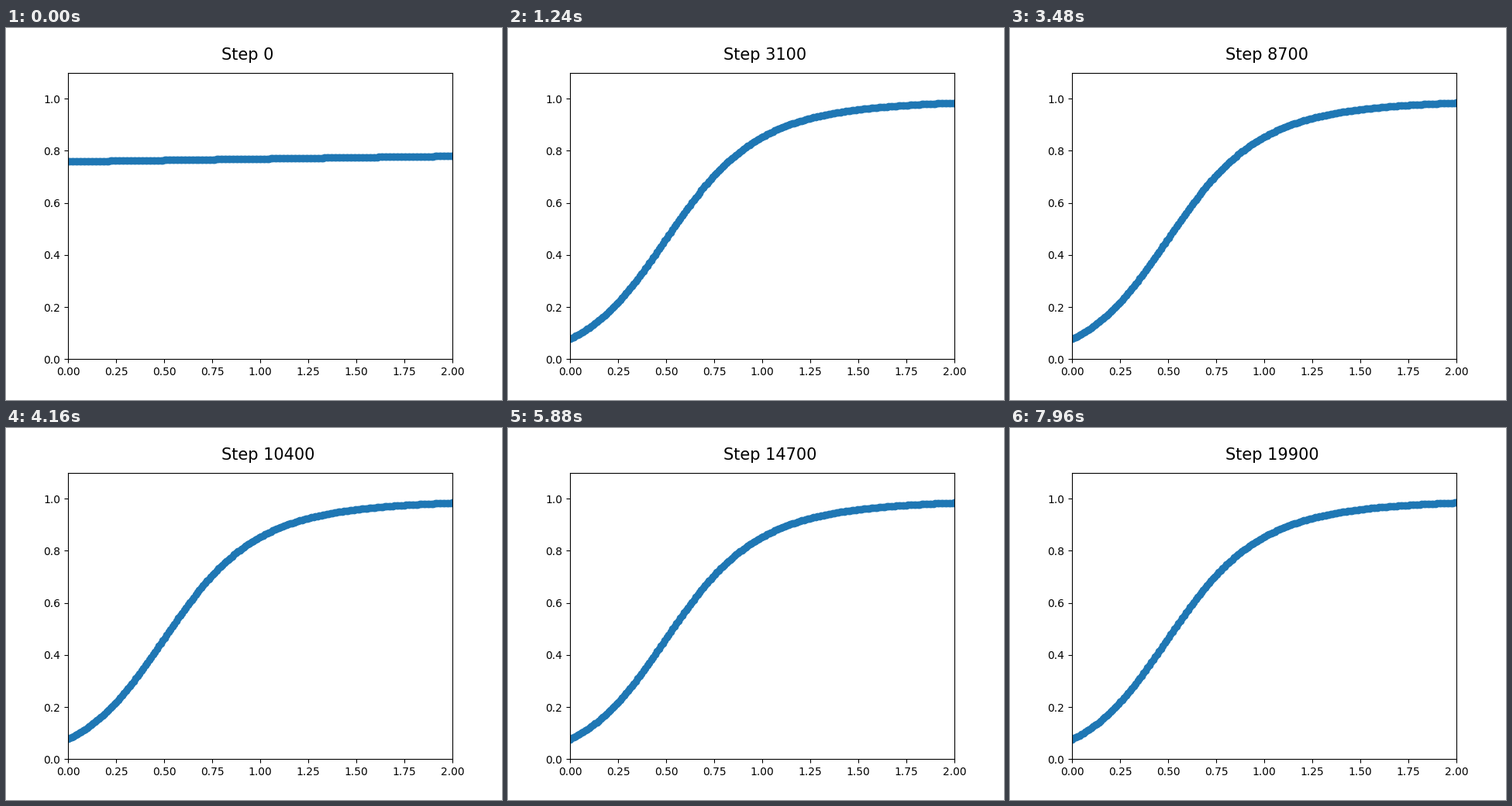
Animation of 640 by 480 pixels, one loop 8 s. Source, as a matplotlib script:

```python
import numpy as np
import matplotlib.pyplot as plt
from matplotlib.animation import FuncAnimation

FRAMES, INTERVAL = 200, 40
STEPS_PER_FRAME = 100

x = np.linspace(0, 2, 200)
knots = np.linspace(0, 2, 5)


def through(logits):
    """Smooth quartic through logits given at the knots."""
    return np.polyval(np.polyfit(knots, logits, 4), x)


start = 1.145 + 0.060 * x
fitted = through([-2.47, -0.152, 1.758, 3.13, 4.12])
settled = through([-2.50, -0.140, 1.760, 3.14, 4.16])


def prediction(step):
    """Network output after a number of training steps."""
    learned = 1 - np.exp(-(step / 700) ** 1.5)
    drift = step / (FRAMES * STEPS_PER_FRAME)
    goal = fitted + drift * (settled - fitted)
    return 1 / (1 + np.exp(-(start + learned * (goal - start))))


fig, ax = plt.subplots(figsize=(6.4, 4.8), dpi=100)
ax.set_xlim(0, 2)
ax.set_ylim(0, 1.1)
dots, = ax.plot(x, prediction(0), "o", color="tab:blue")
label = ax.text(0.8, 1.15, "Step 0", fontsize=15)


def update(i):
    step = i * STEPS_PER_FRAME
    dots.set_ydata(prediction(step))
    label.set_text(f"Step {step}")
    return dots, label


anim = FuncAnimation(fig, update, frames=FRAMES, interval=INTERVAL,
                     repeat=True, repeat_delay=0)
plt.show()
```
